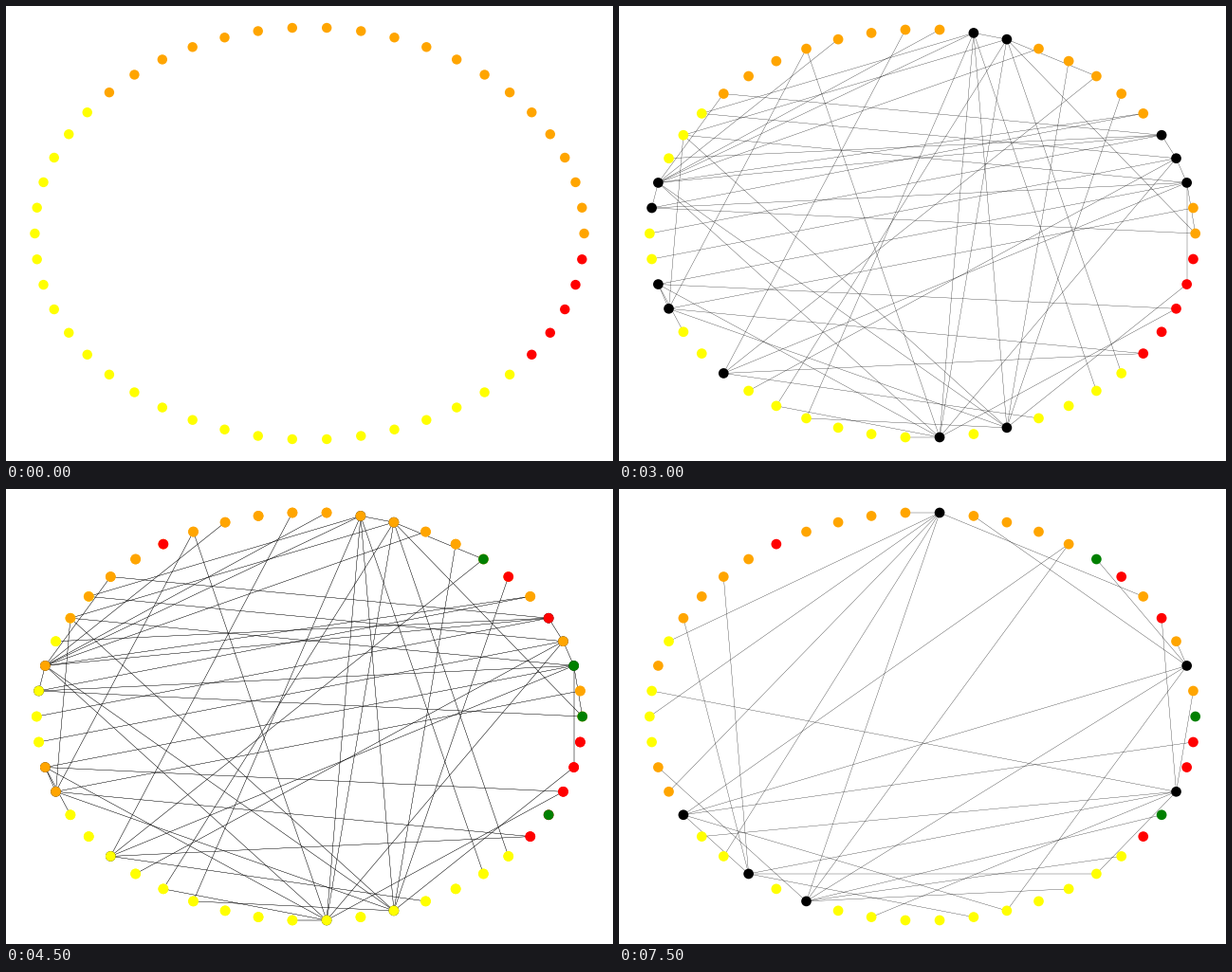
Write a matplotlib script that moves like this. It is 640 px wide and 480 px high and loops after 8000 ms.

```python
import numpy as np
import matplotlib.pyplot as plt
from matplotlib.animation import FuncAnimation
from matplotlib.collections import LineCollection

W, H, DPI = 640, 480, 100
N = 50
STEP = 500  # ms per frame

# hub -> fans (first, last, count) of evenly spread contacts round the ring
ROUND_A = {
    2: [(21, 31, 4), (48, 50, 2)],
    3: [(20, 38, 4)],
    4: [(19, 25, 3)],
    10: [(33, 50, 4), (7, 21, 2)],
    11: [(20, 23, 2), (34, 43, 3)],
    23: [(4, 5, 2), (9, 19, 4), (38, 40, 2)],
    24: [(0, 5, 2)],
    27: [(29, 47, 3)],
    28: [(16, 21, 2), (40, 51, 3)],
    31: [(7, 13, 2), (41, 45, 2)],
    38: [(33, 37, 2), (47, 66, 2)],
    40: [(6, 11, 3), (21, 48, 3)],
}
ROUND_B = {
    2: [(3, 11, 3), (29, 40, 3)],
    12: [(5, 13, 2), (22, 34, 5)],
    29: [(32, 58, 4)],
    32: [(19, 21, 2), (39, 47, 3)],
    34: [(8, 27, 2), (42, 46, 3)],
    47: [(1, 4, 2), (24, 43, 4)],
}


def ring(rx, ry):
    a = 2 * np.pi * np.arange(N) / N
    return np.column_stack([W / 2 + rx * np.cos(a), H / 2 - ry * np.sin(a)])


def links(fans):
    """Pairs of every fan, plus one for each two hubs side by side."""
    pairs = {(hub, hub + 1) for hub in fans if hub + 1 in fans}
    for hub, spans in fans.items():
        for first, last, count in spans:
            for k in range(count):
                other = (first + (last - first) * k // (count - 1)) % N
                pairs.add((min(hub, other), max(hub, other)))
    return sorted(pairs)


def paint(base, color, nodes):
    out = list(base)
    for n in nodes:
        out[n] = color
    return out


START = ["orange"] * 20 + ["yellow"] * 25 + ["red"] * 5
LATER = paint(START, "orange", [20, 21, 23, 27, 28])
LATER = paint(LATER, "red", [4, 6, 17])
LATER = paint(LATER, "green", [0, 2, 7, 46])
ACTIVE_A = paint(START, "black", ROUND_A)
ACTIVE_B = paint(LATER, "black", ROUND_B)

WIDE, TIGHT = ring(289.6, 217.4), ring(287.7, 215.4)

fig = plt.figure(figsize=(W / DPI, H / DPI), dpi=DPI, facecolor="white")
ax = fig.add_axes([0, 0, 1, 1])
ax.set_xlim(0, W)
ax.set_ylim(H, 0)
ax.axis("off")


def dots(pos, diameter, z):
    size = (diameter * 72 / DPI) ** 2
    return ax.scatter(pos[:, 0], pos[:, 1], s=size, c=START, linewidths=0, zorder=z)


def web(fans):
    lines = LineCollection([TIGHT[list(pair)] for pair in links(fans)],
                           colors="black", linewidths=0.21, zorder=1)
    return ax.add_collection(lines)


plain = dots(WIDE, 10.4, 3)
under = dots(TIGHT, 10.7, 2)
linked = dots(TIGHT, 10.7, 3)
under.set_facecolor(ACTIVE_A)
web_a, web_a2, web_b = web(ROUND_A), web(ROUND_A), web(ROUND_B)
ARTISTS = [plain, under, linked, web_a, web_a2, web_b]

# each stage: node colours and the layers on show
STAGES = [
    (START, [plain]),
    (ACTIVE_A, [plain]),
    (ACTIVE_A, [linked, web_a]),
    (LATER, [linked, under, web_a, web_a2]),
    (ACTIVE_B, [plain]),
    (ACTIVE_B, [linked, web_b]),
]


def draw(i):
    colors, shown = STAGES[i * STEP // 1500]
    for art in ARTISTS:
        art.set_visible(art in shown)
    plain.set_facecolor(colors)
    linked.set_facecolor(colors)
    return ARTISTS


anim = FuncAnimation(fig, draw, frames=16, interval=STEP, init_func=lambda: draw(0),
                     repeat=True, repeat_delay=0, blit=False)
plt.show()
```
